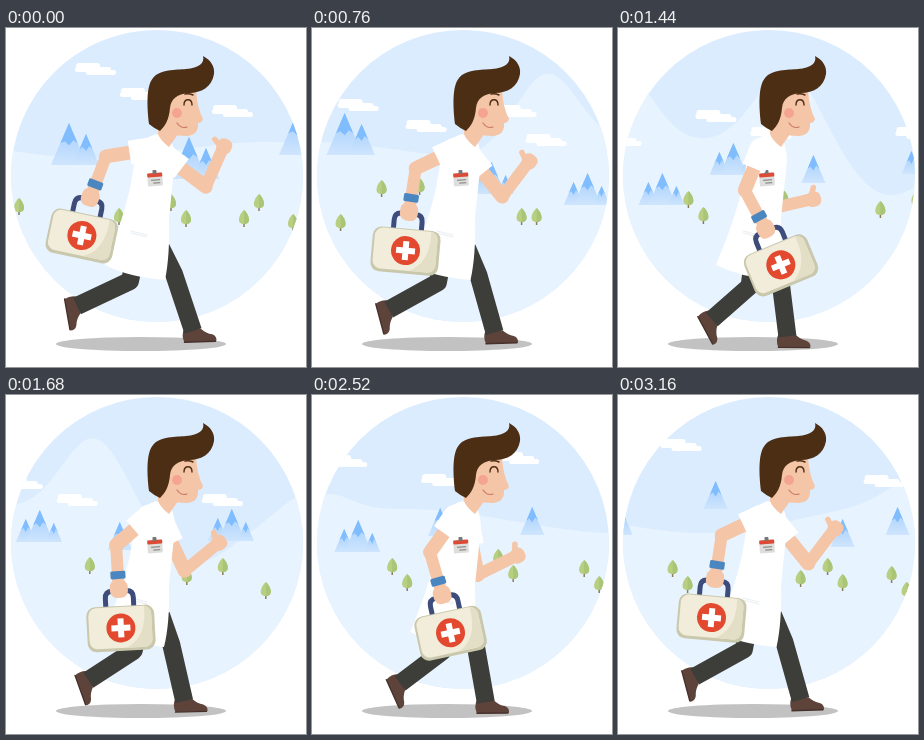
An HTML page with a canvas that plays this animation: 300 px wide and 339 px high, repeating every 3200 ms.

```html
<!DOCTYPE html>
<html lang="en">
<head>
<meta charset="utf-8">
<title>Running doctor</title>
<style>
html, body { margin: 0; width: 100%; height: 100%; overflow: hidden; background: #fff; }
canvas { display: block; width: 300px; height: 339px; }
</style>
</head>
<body>
<canvas id="stage"></canvas>
<script>
const LOOP = 3200, STEP = 40, SWING = 400, SPEED = 0.34;
const SKIN = '#f5c5a7', COAT = '#ffffff', TROUSERS = '#3d3d39', SHOE = '#5d433a', HAIR = '#4c2e15';
const canvas = document.getElementById('stage');
const g = canvas.getContext('2d');
const ratio = window.devicePixelRatio || 1;
canvas.width = 300 * ratio;
canvas.height = 339 * ratio;

// Key points along the scrolling strip, each x, y
const clouds = [[88, 41], [133, 66], [225, 83], [303, 77], [371, 98], [461, 83], [491, 112],
  [586, 88], [641, 105], [786, 105], [890, 66], [985, 85], [1062, 63], [1136, 50], [1339, 86]];
const duos = [[63, 95], [183, 109], [291, 85]];
const trios = [[438, 134], [534, 145], [605, 115], [797, 114], [903, 125]];
const lonePeaks = [[685, 127], [985, 113], [1077, 112], [1172, 86], [1299, 124], [1354, 112]];
const treePairs = [[165, 174], [238, 190], [468, 188], [560, 171], [937, 171], [1043, 162],
  [1129, 173], [1284, 171], [1348, 179]];
const loneTrees = [[13, 178], [113, 188], [287, 194], [328, 160], [366, 158], [655, 170],
  [752, 181], [788, 171], [831, 195], [1257, 183]];

const lerp = (a, b, k) => a + (b - a) * k;
const rad = degrees => degrees * Math.PI / 180;
const reach = (x, y, length, degrees) =>
  [x + length * Math.cos(rad(degrees)), y + length * Math.sin(rad(degrees))];

function fill(color, d) {
  g.fillStyle = color;
  g.fill(new Path2D(d));
}
function stroke(color, width, d, cap = 'round') {
  g.strokeStyle = color;
  g.lineWidth = width;
  g.lineCap = cap;
  g.lineJoin = 'round';
  g.stroke(new Path2D(d));
}
function oval(color, x, y, rx, ry = rx) {
  g.fillStyle = color;
  g.beginPath();
  g.ellipse(x, y, rx, ry, 0, 0, 7);
  g.fill();
}
function box(color, x, y, w, h, r = 0) {
  g.fillStyle = color;
  g.beginPath();
  g.roundRect(x, y, w, h, r);
  g.fill();
}
function placed(x, y, degrees, draw) {
  g.save();
  g.translate(x, y);
  g.rotate(rad(degrees));
  draw();
  g.restore();
}

function cloud([x, y]) {
  box('#fff', x - 18, y - 6, 24, 6, 3);
  box('#fff', x - 19, y - 2, 36, 5, 2.5);
  box('#fff', x - 8, y + 1, 30, 5, 2.5);
}
function peak(x, top, base) {
  const h = base - top, half = h * 0.43, cap = h * 0.48;
  const w = cap * 0.43, y = top + cap;
  const shade = g.createLinearGradient(0, top, 0, base);
  shade.addColorStop(0, '#a0cdfe');
  shade.addColorStop(1, '#cfe5fd');
  fill(shade, `M${x} ${top}L${x + half} ${base}H${x - half}Z`);
  fill('#80bdff', `M${x} ${top}L${x + w} ${y}L${x + w / 2} ${y - 3}L${x} ${y + 2}L${x - w / 2} ${y - 2}L${x - w} ${y}Z`);
}
function duo([x, y]) {
  peak(x, y, y + 42);
  peak(x + 17, y + 11, y + 42);
}
function trio([x, y]) {
  peak(x - 14, y + 9, y + 32);
  peak(x, y, y + 32);
  peak(x + 14, y + 13, y + 32);
}
function tree([x, y]) {
  const side = s => `M${x} ${y - 8}C${x + 4 * s} ${y - 5} ${x + 9 * s} ${y + 6} ${x} ${y + 6}Z`;
  stroke('#8d7c55', 1.5, `M${x} ${y}V${y + 9}`, 'butt');
  fill('#b8cf82', side(-1) + side(1));
  fill('#abc577', side(1));
}
function ridge(x) {
  const bump = (center, height, width) => height * Math.exp(-(((x - center) / width) ** 2));
  return 122 + 8 * Math.sin(x / 55) - bump(493, 80, 45) - bump(660, 75, 45)
    + bump(760, 38, 50) - bump(870, 22, 35) + bump(1200, 12, 90) - bump(1400, 55, 60);
}
function scenery(t) {
  const left = SPEED * t;
  g.save();
  g.beginPath();
  g.arc(151, 148, 146, 0, 7);
  g.clip();
  box('#dbecfe', 0, 0, 300, 300);
  g.translate(-left, 0);
  let d = `M${left} 300`;
  for (let x = left; x <= left + 300; x += 4) d += `L${x} ${ridge(x)}`;
  fill('#e7f3fe', d + 'V300Z');
  loneTrees.forEach(tree);
  treePairs.forEach(([x, y], i) => {
    tree([x, y]);
    tree([x + 15, y + (i === 1 ? -16 : i === 2 ? 0 : 16)]);
  });
  duos.forEach(duo);
  trios.forEach(trio);
  lonePeaks.forEach(([x, y]) => peak(x, y, y + 28));
  clouds.forEach(cloud);
  g.restore();
}

function leg(hx, hy, kx, ky, ax, ay, tilt) {
  placed(ax, ay, tilt, () => {
    fill(SHOE, 'M-9 -2H8Q13 3 19 4Q24 6 23 11H-9Q-12 4 -9 -2Z');
    stroke('#46322c', 1.4, 'M-9 11H22');
  });
  stroke(TROUSERS, 18, `M${hx} ${hy}L${kx} ${ky}L${ax} ${ay}`, 'butt');
}
// Upper arm, forearm and sleeve; returns elbow and hand
function arm(sx, sy, upper, lower, upperTurn, lowerTurn) {
  const [ex, ey] = reach(sx, sy, upper, upperTurn);
  const [hx, hy] = reach(ex, ey, lower, lowerTurn);
  const [cx, cy] = reach(sx, sy, upper * 0.46, upperTurn);
  stroke(SKIN, 14, `M${cx} ${cy}L${ex} ${ey}`);
  stroke(SKIN, 12, `M${ex} ${ey}L${hx} ${hy}`);
  oval(COAT, sx, sy, 12);
  stroke(COAT, 24, `M${sx} ${sy}L${cx} ${cy}`, 'butt');
  return [hx, hy];
}
function farArm(u) {
  const turn = 0.33 * u - 66;
  const [x, y] = arm(155, 125, 56, 43, 37 + 0.35 * u, turn);
  placed(x, y, turn, () => {
    box(SKIN, -6, -7, 15, 15, 6);
    stroke(SKIN, 5.5, 'M0 -3L4 -11');
  });
}
function bag() {
  stroke('#3d4c7b', 5, 'M-14 16V7Q-14 0 -7 0H7Q14 0 14 7V16');
  placed(0, 37, 0, () => {
    box('#c9c7ac', -34, -22, 68, 45, 9);
    box('#f1edda', -32, -21, 63, 41, 8);
    fill('#e3dfc6', 'M24 -21Q31 -20 31 -13V12Q31 20 23 20H5Q26 10 24 -21Z');
    oval('#e2492f', 0, 0, 14.5);
    box('#fff', -9.5, -3, 19, 6);
    box('#fff', -3, -9.5, 6, 19);
  });
}
function nearArm(u) {
  const upperTurn = 171 - 0.42 * u + 0.00033 * u * u;
  const lowerTurn = 111 - 0.308 * u;
  const bagTurn = 12 - 0.16 * u - 0.00035 * u * u;
  const [ex, ey] = reach(143.5, 121.5, 44, upperTurn);
  const [x, y] = reach(ex, ey, 46, lowerTurn);
  placed(x, y, bagTurn, bag);
  arm(143.5, 121.5, 44, 46, upperTurn, lowerTurn);
  placed(x, y, lowerTurn, () => {
    box(SKIN, -11, -9, 18, 18, 7);
    box('#4a86c0', -20, -7.5, 8, 15, 1.5);
  });
}
function legs(k) {
  const drop = k * (1.4 - 0.4 * k);
  leg(lerp(128, 145, k), 234, lerp(124, 143, k), lerp(253, 266, k),
    lerp(71, 128, k), lerp(278, 305, drop), lerp(80, 43, drop));
  leg(155, 220, lerp(168, 154, k), lerp(246, 262, k),
    lerp(187, 143, k), lerp(303, 314, drop), lerp(-2, 14, k * k));
}
function coat(k) {
  const front = lerp(159, 154, k), back = lerp(99, 96, k);
  fill(COAT, `M150 106L164 111Q171 124 168 142L163 190Q164 228 ${front} 252Q122 249 ${back} 237Q117 192 124 160L131 120Q137 110 150 106Z`);
  stroke('#e9eef2', 1, 'M125 203L141 207M125 205L141 209');
  placed(149, 151, -4, () => {
    box('#dedfdd', -7.5, -6, 15, 13, 1);
    box('#dd4a35', -7.5, -6, 15, 4, 1);
    box('#777', -2, -9, 4, 4, 1);
    stroke('#8f8f8c', 1.3, 'M-4 1H5M-2 4H5', 'butt');
  });
}
function head() {
  fill(SKIN, 'M152 94L175 102L163 119Q154 112 152 106Z');
  fill(SKIN, 'M159 62H190Q191 80 197 91Q196 95 192 95Q193 107 181 108Q163 108 155 98Z');
  fill(HAIR, 'M143 96C141 79 140 58 147 50C154 41 170 42 180 41C193 40 199 35 197 28C205 32 209 39 208 46C206 59 195 65 183 65C171 66 165 71 164 80C163 92 159 98 154 103Q149 101 143 96Z');
  oval('#f4a491', 171, 85, 5);
  stroke(HAIR, 1.5, 'M179 66Q183 65 187 67');
  stroke(HAIR, 1.4, 'M178 77C178 70 186 70 186 77');
  stroke('#cc7a64', 1.2, 'M171 95Q175 101 181 99');
}

function draw(t) {
  const phase = t % (2 * SWING);
  const u = Math.min(phase, 2 * SWING - phase);
  const k = u / SWING;
  g.setTransform(ratio, 0, 0, ratio, 0, 0);
  g.clearRect(0, 0, 300, 339);
  scenery(t);
  oval('#c2c2c2', 135, 316, 85, 7);
  farArm(u);
  legs(k);
  coat(k);
  head();
  nearArm(u);
}

const start = performance.now();
function tick() {
  const t = (performance.now() - start) % LOOP;
  draw(Math.floor(t / STEP) * STEP);
  requestAnimationFrame(tick);
}
tick();
</script>
</body>
</html>
```
